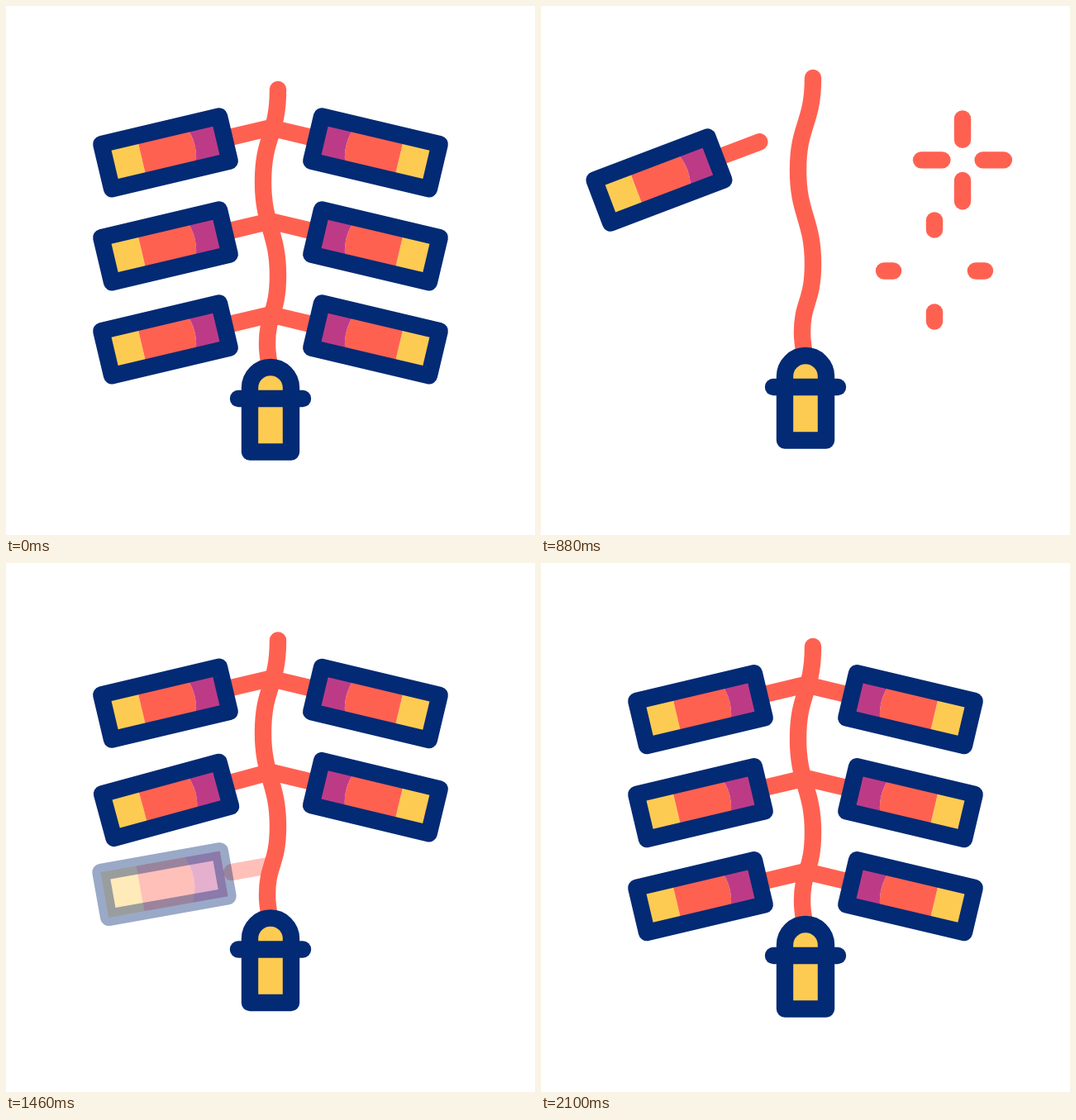
An HTML page with a canvas for the animation above (2600 ms loop, 640x640 px).

```html
<!DOCTYPE html>
<html lang="en">
<head>
<meta charset="utf-8">
<title>Firecrackers</title>
<style>
html, body { margin: 0; width: 100%; height: 100%; overflow: hidden; background: #fff; }
canvas { display: block; width: 100vw; height: 100vh; }
</style>
</head>
<body>
<canvas id="stage" width="640" height="640"></canvas>
<script>
const ctx = document.getElementById('stage').getContext('2d');
const NAVY = '#032a74', RED = '#ff6151', YELLOW = '#fecb52', PURPLE = '#bd3b86';
const LOOP = 2600, STEP = 20, LINE = 20.4, TILT = -13.3, ARM = 130;
const SPARK_TIME = 280, FADE = 100;
const rad = deg => deg * Math.PI / 180;

// Vertical bob of the string: [time, offset]
const bobKeys = [[200, 0], [480, 28], [790, -22], [1133, 28], [1422, -8], [1784, 11], [2100, 0]];

// side 1 = left, -1 = right; dx, dy = flight before the burst
const crackers = [
  { side: 1,  y: 177.3, start: 680, burst: 885, dx: 52, dy: 49, back: 1120 },
  { side: -1, y: 177.3, start: 590, burst: 796, dx: 63, dy: 31, back: 1195 },
  { side: 1,  y: 290.3, start: 393, burst: 590, dx: 45, dy: 45, back: 1270 },
  { side: -1, y: 290.3, start: 476, burst: 642, dx: 29, dy: 29, back: 1345 },
  { side: 1,  y: 403.3, start: 245, burst: 456, dx: 66, dy: 67, back: 1420 },
  { side: -1, y: 403.3, start: 310, burst: 531, dx: 61, dy: 61, back: 1495 }
];

const stringPath = new Path2D(
  'M329 101C329 157 311 157 311 213C311 266 329 273 329 326C329 372 316 372 316 409Q316 420 319 436');
const bellPath = new Path2D('M295 539.5V462a25 25 0 0 1 50 0V539.5Z');
const barPath = new Path2D('M281 475H359');
const stemPath = new Path2D(`M83 0H${ARM}`);
const casePath = new Path2D('M-73.3 -27.8H73.3V27.8H-73.3Z');
const bands = [
  [YELLOW, new Path2D('M-73.3 -27.8H-29.5V27.8H-73.3Z')],
  [RED, new Path2D('M-29.5 -27.8H30Q43 0 30 27.8H-29.5Z')],
  [PURPLE, new Path2D('M73.3 -27.8H30Q43 0 30 27.8H73.3Z')]
];

function bob(t) {
  for (let i = 1; i < bobKeys.length; i++) {
    const [t0, a] = bobKeys[i - 1], [t1, b] = bobKeys[i];
    if (t < t0) return a;
    if (t < t1) return a + (b - a) * (1 - Math.cos(Math.PI * (t - t0) / (t1 - t0))) / 2;
  }
  return 0;
}

function stroke(path, color) {
  ctx.strokeStyle = color;
  ctx.stroke(path);
}

function fill(path, color) {
  ctx.fillStyle = color;
  ctx.fill(path);
}

function drawBody() {
  stroke(stemPath, RED);
  for (const [color, path] of bands) fill(path, color);
  stroke(casePath, NAVY);
}

// Swing angle after reappearing: drops past rest, then settles
function swing(age) {
  if (age < 165) return 5 - 7.5 * age / 165;
  return Math.min(0, -2.5 * (1 - (age - 165) / 105));
}

function drawSpark(p) {
  const from = 21 + 40 * p * p, to = 21 + 40 * (1 - (1 - p) ** 3.6);
  const ray = new Path2D(`M${from} 0H${to}`);
  for (let i = 0; i < 4; i++) {
    stroke(ray, RED);
    ctx.rotate(Math.PI / 2);
  }
}

function drawCracker(c, t) {
  ctx.save();
  ctx.translate(320, 0);
  ctx.scale(c.side, 1);
  if (t < c.burst) {
    const u = Math.max(0, (t - c.start) / (c.burst - c.start)) ** 1.5;
    ctx.translate(-127 - c.dx * u, c.y + bob(t) + c.dy * u);
    ctx.rotate(rad(TILT - 0.15 * c.dx * u));
    drawBody();
  } else if (t >= c.back) {
    const age = t - c.back;
    ctx.globalAlpha = Math.min(1, age / FADE);
    ctx.translate(-0.5, c.y - 30 + bob(t));
    ctx.rotate(rad(TILT + swing(age)));
    ctx.translate(-ARM, 0);
    drawBody();
  } else if (t < c.burst + SPARK_TIME) {
    ctx.translate(-127 - c.dx, c.y + c.dy + bob(c.burst));
    drawSpark((t - c.burst) / SPARK_TIME);
  }
  ctx.restore();
}

function drawString(t) {
  ctx.save();
  ctx.translate(0, bob(t));
  stroke(stringPath, RED);
  fill(bellPath, YELLOW);
  stroke(bellPath, NAVY);
  stroke(barPath, NAVY);
  ctx.restore();
}

function frame(now) {
  const t = Math.floor(now % LOOP / STEP) * STEP;
  ctx.fillStyle = '#fff';
  ctx.fillRect(0, 0, 640, 640);
  ctx.lineWidth = LINE;
  ctx.lineCap = ctx.lineJoin = 'round';
  for (const c of crackers) drawCracker(c, t);
  drawString(t);
}

const begin = performance.now();
function tick() {
  frame(performance.now() - begin);
  requestAnimationFrame(tick);
}
tick();
</script>
</body>
</html>
```
